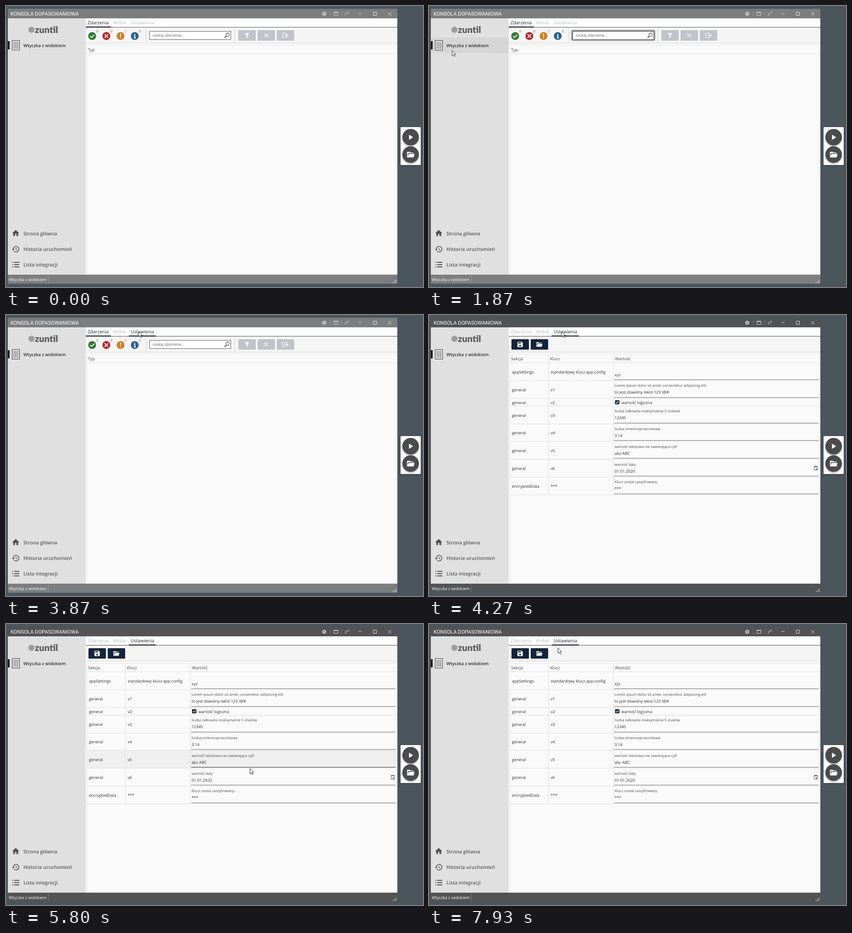
Write an HTML page that moves like this. It is 910 px wide and 615 px high and loops after 8 s.

```html
<!DOCTYPE html>
<html lang="pl">
<head>
<meta charset="utf-8">
<title>Wtyczka z widokiem</title>
<style>
html, body { margin: 0; width: 100%; height: 100%; overflow: hidden; background: #4b555c; }
svg { display: block; width: 910px; height: 615px; }
text { font-family: "Open Sans", "Noto Sans", sans-serif; fill: #2b2b2b; white-space: pre; text-rendering: geometricPrecision; }
.title { font: 400 11.2px Roboto, sans-serif; fill: #fff; }
.brand { font: 900 20px Lato, sans-serif; fill: #58585a; }
.menu { font-size: 10.65px; font-weight: 600; fill: #58585a; }
.tab { font-size: 10px; fill: #b9b9b9; }
.tab.on { fill: #1b2230; }
.head { font-size: 9px; fill: #444; }
.cell { font-size: 8.7px; }
.label { font-size: 7.85px; fill: #4a4a4a; }
.count { font-size: 7px; }
.line { fill: none; stroke: #dedede; }
.ink { fill: none; stroke: #fff; }
.under { stroke: #707070; }
.back { fill: none; }
.row.on .under { stroke: #333; }
.row.on .back { fill: #efefef; }
.chrome { fill: #7c7d7f; }
.active .chrome { fill: #525355; }
#settings, .active #events { display: none; }
.active #settings { display: inline; }
</style>
</head>
<body>
<svg id="stage" viewBox="0 0 910 615">
  <defs>
    <filter id="blur" x="-10%" y="-60%" width="120%" height="220%"><feGaussianBlur stdDeviation="1.5"/></filter>
    <path id="folder" d="M19 20H4a2 2 0 0 1-2-2V6c0-1.1.9-2 2-2h6l2 2h7a2 2 0 0 1 2 2H4v10l2.14-8h17.07l-2.28 8.5c-.23.87-1.01 1.5-1.93 1.5z"/>
  </defs>

  <rect class="chrome" x="4" y="6" width="850" height="602"/>
  <rect x="4" y="27" width="170" height="561" fill="#e0e0e0"/>
  <rect x="174" y="27" width="680" height="561" fill="#fff"/>

  <!-- title bar -->
  <text class="title" x="10" y="20.7">KONSOLA DOPASOWANIOWA</text>
  <g class="ink" style="stroke:#d0d0d0">
    <circle cx="694.5" cy="17" r="2.6" stroke-width="2"/>
    <circle cx="694.5" cy="17" r="4" stroke-width="1.5" stroke-dasharray="1.6 1.54"/>
    <path d="M707.5 12v10M732.5 12v10" stroke="#fff" stroke-opacity=".25"/>
    <path d="M715.5 13.5h9v7h-9zM715.5 14.5h9"/>
    <path d="M739.5 16.5h3l-3 3.5h3M743.5 14.5h2.2l-2.2 2.6h2.2M746.5 13h2l-2 2.2h2" stroke-width=".8"/>
    <path d="M769 16.5h7M801.5 13.5h7v7h-7zM834 13.5l7 7m0-7l-7 7" stroke="#f4f4f4" stroke-width=".9"/>
  </g>

  <!-- side menu -->
  <rect id="menuHover" x="4" width="170" height="34" fill="#d6d6d6"/>
  <circle cx="55.5" cy="52" r="6.8" fill="#9d9d9f"/>
  <text class="brand" x="63" y="59">zuntil</text>
  <rect x="4" y="77" width="4" height="18" fill="#1c1c1e"/>
  <rect x="13.5" y="75.5" width="16" height="21" fill="#efefef" stroke="#2a2a2a"/>
  <path d="M17.5 78v16M21.5 78v16M25.5 78v16" stroke="#a8a8a8" stroke-width="3.2"/>
  <text x="38" y="90" font-size="9.5" font-weight="600" fill="#222">Wtyczka z widokiem</text>
  <g fill="#505052">
    <path transform="translate(12 488) scale(.77)" d="M10 20v-6h4v6h5v-8h3L12 3 2 12h3v8z"/>
    <path transform="translate(12 523) scale(.77)" d="M13 3a9 9 0 0 0-9 9H1l3.9 3.9L9 12H6a7 7 0 1 1 2.05 4.95l-1.42 1.42A9 9 0 1 0 13 3zm-1 5v5l4.3 2.5.7-1.2-3.5-2.1V8z"/>
    <path d="M14 560h2v2h-2zM14 565h2v2h-2zM14 570h2v2h-2zM18 560h11v2h-11zM18 565h11v2h-11zM18 570h11v2h-11z"/>
  </g>
  <text class="menu" x="38" y="502">Strona główna</text>
  <text class="menu" x="38" y="536">Historia uruchomień</text>
  <text class="menu" x="38" y="570">Lista integracji</text>

  <!-- status bar -->
  <text x="6" y="601.5" font-size="8.9" style="fill:#fff">Wtyczka z widokiem</text>
  <path d="M92.5 590v16" stroke="#fff" stroke-opacity=".22"/>
  <path d="M851.5 599v7.5M849 601.5v5M846.5 604v2.5M844.5 605v1.5" stroke="#ddd" stroke-width="1.4" stroke-dasharray="1.5 1"/>

  <!-- toolbar and grid frame -->
  <rect x="174" y="47" width="680" height="34" fill="#f5f5f5"/>
  <path d="M174 81.5h680" stroke="#cfcfcf"/>
  <path d="M174 46.5h680" stroke="#4a4f50"/>
  <rect class="line" x="176.5" y="85.5" width="675" height="501" style="fill:#fafafa"/>
  <path class="line" d="M176 104.5h676"/>
  <g id="tabs"></g>

  <g id="events">
    <g id="badges"></g>
    <path class="line" d="M305.5 49v31M499.5 49v31" style="stroke:#d4d4d4"/>
    <rect id="glow" x="313" y="55" width="178" height="18.5" fill="none" stroke="#222" stroke-width="2.6" filter="url(#blur)"/>
    <rect x="313.5" y="55.5" width="177" height="18" fill="#fff" stroke="#5c5c5c"/>
    <text x="320" y="67" font-size="8.2" style="fill:#555">szukaj zdarzenia...</text>
    <g class="ink" style="stroke:#444"><circle cx="483.5" cy="62.8" r="3.7" stroke-width="1.1"/><path d="M481 65.6l-4 4" stroke-width="1.8"/></g>
    <g fill="#c1c3c8"><rect x="507" y="53" width="38" height="23" rx="2"/><rect x="549" y="53" width="38" height="23" rx="2"/><rect x="591" y="53" width="38" height="23" rx="2"/></g>
    <path d="M520.5 59h11l-4 5.2v6l-3-2v-4z" fill="#f4f4f6"/>
    <path class="ink" d="M563.7 60.2l8.2 8.2m0-8.2l-8.2 8.2" stroke-width="1.3"/>
    <path class="ink" d="M612 62v-2.5h-8.5v9.5h8.5v-2.5M607 64.3h8.5m-2.5-2.5l2.7 2.5-2.7 2.5" stroke-width="1.2"/>
    <text class="head" x="179" y="99">Typ</text>
  </g>

  <g id="settings">
    <g fill="#14243c"><rect x="180" y="53" width="38" height="22.7" rx="1.5"/><rect x="222" y="53" width="38" height="22.7" rx="1.5"/></g>
    <path transform="translate(191 56.5) scale(.65)" fill="#fff" fill-rule="evenodd" d="M15 9H5V5h10zm-3 10a3 3 0 1 1 0-6 3 3 0 0 1 0 6M17 3H5a2 2 0 0 0-2 2v14a2 2 0 0 0 2 2h14a2 2 0 0 0 2-2V7z"/>
    <use href="#folder" fill="#fff" transform="translate(233 57) scale(.63)"/>
    <text class="head" x="179" y="99">Sekcja</text>
    <text class="head" x="264" y="99">Klucz</text>
    <text class="head" x="406" y="99">Wartość</text>
    <g id="rows"></g>
    <path class="line" d="M260.5 86v308M402.5 86v308"/>
    <rect x="406" y="186.5" width="9.5" height="9" rx="1" fill="#14243c"/>
    <path class="ink" d="M408 191l2 2 3.6-4" stroke-width="1.2"/>
    <path d="M840.5 331.5h7v8h-7zM840 332.5h8M842 330v2M846 330v2" fill="none" stroke="#555" stroke-width=".9"/>
    <rect x="844" y="336" width="2.5" height="2.5" fill="#666"/>
  </g>

  <!-- floating panel -->
  <rect x="861" y="266" width="44" height="83" fill="#222" opacity=".6" filter="url(#blur)"/>
  <rect x="861" y="265" width="44" height="83" rx="1.5" fill="#fff"/>
  <g fill="#222" opacity=".45" filter="url(#blur)"><circle cx="883" cy="289" r="18"/><circle cx="883" cy="327" r="18"/></g>
  <circle cx="883" cy="287" r="18" fill="#4b4b4d"/>
  <circle cx="883" cy="325" r="18" fill="#4b4b4d"/>
  <path d="M879.5 281.5v11.5l9-5.75z" fill="#fff"/>
  <use href="#folder" fill="#fff" transform="translate(873.5 316) scale(.78)"/>

  <path id="arrow" d="M.4.4v11.4l2.6-2.4 1.8 4 1.9-.8-1.8-3.9h3.6z" fill="#fff" stroke="#222" stroke-width=".9"/>
  <path id="beam" d="M-2.5-6h2l.5.6.5-.6h2M0-5.4v10.8M-2.5 6h2l.5-.6.5.6h2" fill="none" stroke="#111" stroke-width="1.1"/>
</svg>
<script>
const $ = id => document.getElementById(id);
const label = (cls, x, y, s, more = '') => `<text class="${cls}" x="${x}" y="${y}" ${more}>${s}</text>`;
const crisp = v => Math.floor(v) + .5;

// name, text x, underline start and end
const tabs = [['Zdarzenia', 178, 174, 229], ['Widok', 233, 229, 268], ['Ustawienia', 272, 268, 327]];
$('tabs').innerHTML = tabs.map(([s, x, a, b]) =>
  `<g>${label('tab', x, 40, s)}<rect x="${a}" y="45" width="${b - a}" height="2" fill="#111"/></g>`).join('');

const marks = [
  ['#2e7d32', 'M183.5 65.8l3.2 3.2 6-6.2'],
  ['#bd2227', 'M215.2 62l7.6 7.6m0-7.6l-7.6 7.6'],
  ['#cf8222', 'M250 60.3v6.2m0 2v2'],
  ['#2a648e', 'M279.5 64.5h1.7v5m-2 .5h4m-2.2-9.3v2']
];
$('badges').innerHTML = marks.map(([c, d], i) => {
  const x = 188 + 31 * i;
  return `<circle cx="${x}" cy="65.7" r="8.6" fill="${c}"/><path class="ink" d="${d}" stroke-width="1.9"/>`
    + label('count', x + 9, 58, '0', `style="fill:${c}"`);
}).join('');

const data = [
  ['appSettings', 'standardowy klucz app.config', '', 'xyz'],
  ['general', 'v1', 'Lorem ipsum dolor sit amet, consectetur adipiscing elit', 'to jest dowolny tekst 123 !@#'],
  ['general', 'v2', '', 'wartość logiczna'],
  ['general', 'v3', 'liczba całkowita maksymalnie 5 znaków', '12345'],
  ['general', 'v4', 'liczba zmiennoprzecinkowa', '3.14'],
  ['general', 'v5', 'wartość tekstowa nie zawierająca cyfr', 'abc ABC'],
  ['general', 'v6', 'wartość daty', '01.01.2020'],
  ['encryptedData', '***', 'Klucz zostal zaszyfrowany', '***']
];
const CHECK = 2;
const edges = [104.75];
data.forEach((_, i) => edges.push(edges[i] + (i === CHECK ? 17 : 38.8)));

$('rows').innerHTML = data.map(([section, key, hint, value], i) => {
  const top = Math.ceil(edges[i]), end = edges[i + 1], mid = (edges[i] + end) / 2 + 3.9;
  const field = i === CHECK ? label('cell', 420, mid + .5, value)
    : label('label', 405, end - 25, hint) + label('cell', 405, end - 10, value)
      + `<path class="under" d="M404 ${crisp(end - 2)}h446"/>`;
  return `<g class="row"><rect class="back" x="177" y="${top}" width="674" height="${Math.floor(end) - top}"/>`
    + label('cell', 181, mid, section) + label('cell', 265.5, mid, key) + field
    + `<path class="line" d="M176 ${crisp(end)}h676"/></g>`;
}).join('');

// pointer: time, x, y
const path = [
  [1200, 7, 565], [1267, 14, 559], [1590, 14, 559], [1867, 50, 97], [2133, 85, 74], [2400, 180, 75],
  [2800, 250, 38], [3180, 250, 38], [3400, 270, 54], [3600, 289, 36], [4400, 289, 36],
  [4933, 478, 144], [5333, 512, 214], [5800, 532, 316], [6200, 540, 362], [6267, 543, 382],
  [7133, 543, 382], [7933, 281, 52], [8000, 281, 52]
];
const same = (a, b) => a[1] === b[1] && a[2] === b[2];

// zero at rests, otherwise the mean speed between the neighbours
function speed(i, axis) {
  const a = path[i - 1], p = path[i], b = path[i + 1];
  if (!a || !b || same(a, p) || same(p, b)) return 0;
  return (b[axis] - a[axis]) / (b[0] - a[0]);
}

function pointer(t) {
  let i = 0;
  while (i < path.length - 2 && path[i + 1][0] <= t) i++;
  const p = path[i], q = path[i + 1], span = q[0] - p[0], u = (t - p[0]) / span;
  return [1, 2].map(k => {
    const ease = u * u * (3 - 2 * u);
    return p[k] + (q[k] - p[k]) * ease
      + span * u * (1 - u) * ((1 - u) * speed(i, k) - u * speed(i + 1, k));
  });
}

const show = (el, on) => { el.style.display = on ? '' : 'none'; };
const ramp = (t, a, b) => Math.min(1, Math.max(0, (t - a) / (b - a)));

function render(t) {
  const seen = t >= 1199, active = t >= 4260;
  const [x, y] = seen ? pointer(t) : [-50, -50];
  $('stage').classList.toggle('active', active);
  $('glow').style.opacity = ramp(t, 500, 900) * (1 - ramp(t, 2000, 2400));

  const menuTop = [69, 481, 515, 549].find(m => y >= m && y < m + 34);
  const onMenu = menuTop !== undefined && x > 4 && x < 174;
  show($('menuHover'), onMenu);
  if (onMenu) $('menuHover').setAttribute('y', menuTop);

  [...$('tabs').children].forEach((g, i) => {
    const [, , a, b] = tabs[i];
    const on = i === (active ? 2 : 0) || (y > 27 && y < 47 && x >= a && x < b);
    g.firstChild.classList.toggle('on', on);
    show(g.lastChild, on);
  });

  const row = data.findIndex((_, i) => y - 2 >= edges[i] && y - 2 < edges[i + 1]);
  [...$('rows').children].forEach((g, i) => g.classList.toggle('on', i === row));
  const end = edges[row + 1];
  const typing = active && row >= 0 && row !== CHECK && x > 404 && y > end - 21 && y < end - 3;
  show($('arrow'), seen && !typing);
  show($('beam'), seen && typing);
  $(typing ? 'beam' : 'arrow').setAttribute('transform', `translate(${Math.round(x)} ${Math.round(y)})`);
}

// the screen is refreshed 15 times a second
function tick() {
  const t = performance.now() % 8000;
  render(Math.floor(t * .015 + .1) / .015);
  requestAnimationFrame(tick);
}
tick();
</script>
</body>
</html>
```
